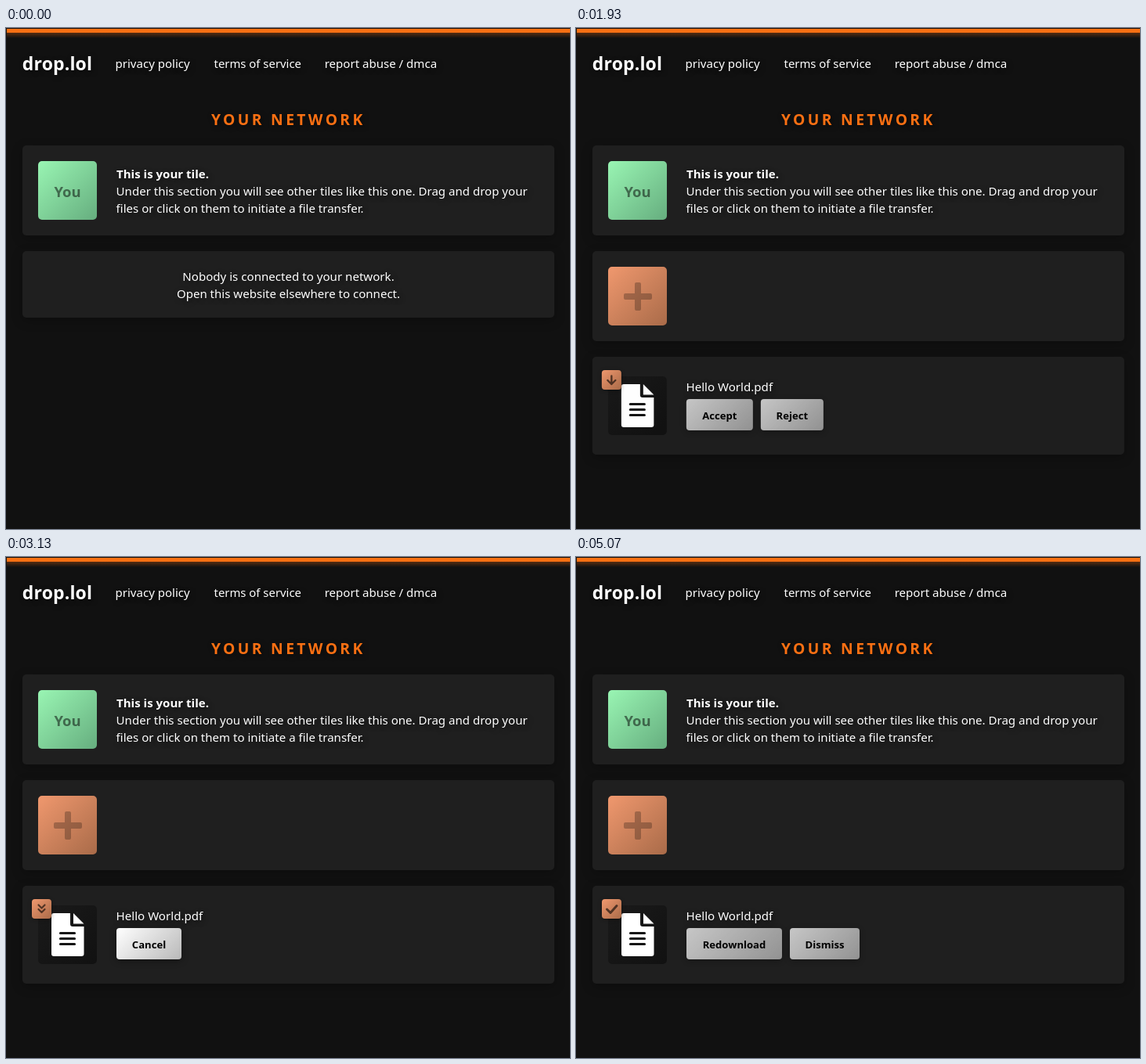
An HTML page that plays this animation: 720 px wide and 640 px high, repeating every 5540 ms.

```html
<!DOCTYPE html>
<html lang="en">
<head>
<meta charset="utf-8">
<title>drop.lol</title>
<style>
html, body { margin: 0; width: 720px; height: 640px; overflow: hidden; background: #111; }
body { position: relative; font: 15.05px "Noto Sans", "Open Sans", sans-serif; color: #fff; }
div, p, svg, button { position: absolute; margin: 0; box-sizing: border-box; }
/* zero line height: top is the middle of the text */
p { line-height: 0; white-space: pre; text-shadow: 2px 2px 6px rgba(0,0,0,.5); }
.bar { left: 1px; top: 1px; width: 719px; height: 5px; background: #fb7013; }
.glow { left: 1px; top: 6px; width: 719px; height: 7px; background: linear-gradient(rgba(251,112,19,.3), rgba(251,112,19,0)); }
.panel { left: 21px; width: 679px; border-radius: 5px; background: #1f1f1f; box-shadow: 0 4px 14px rgba(0,0,0,.25); }
.mid { left: 0; width: 679px; text-align: center; }
.tile { left: 20px; top: 20px; width: 75px; height: 75px; border-radius: 5px; }
.green { background: linear-gradient(135deg, #99f5b3, #66ae7f); }
.orange { background: linear-gradient(135deg, #f0986e, #a96b49); }
.file { top: 25px; background: linear-gradient(135deg, #1a1a1a, #111); }
.badge { left: 12px; top: 17px; width: 25px; height: 25px; border-radius: 4px; box-shadow: 0 1px 5px rgba(0,0,0,.4); }
.badge path { fill: none; stroke: rgba(0,0,0,.6); stroke-linecap: round; stroke-linejoin: round; }
button { top: 54px; height: 40px; padding: 0; border: 0; background: none; font: bold 13.1px/42px "Noto Sans", "Open Sans", sans-serif; color: #000; isolation: isolate; }
button::before { content: ""; position: absolute; inset: 0; z-index: -1; border-radius: 4px; opacity: var(--lit, .75);
  background: linear-gradient(135deg, #fff, #b9b9b9); box-shadow: 0 2px 8px rgba(0,0,0,.4); }
.track { left: 218px; top: 54px; width: 160px; height: 16px; border-radius: 4px; overflow: hidden; background: #4b4b4b; }
#fill { height: 16px; background: #c07847; }
[hidden] { display: none; }
</style>
</head>
<body>
<div class="bar"></div><div class="glow"></div>
<p style="left:20.8px;top:45px;font-size:23px;font-weight:bold;letter-spacing:.15px">drop.lol</p>
<p style="left:139.500px;top:45px">privacy policy</p>
<p style="left:265.500px;top:45px;font-size:14.9px">terms of service</p>
<p style="left:406.700px;top:45px">report abuse / dmca</p>
<p style="left:262px;top:116.500px;font-size:19.3px;font-weight:bold;letter-spacing:3.360px;color:#fb7013">YOUR NETWORK</p>

<div class="panel" style="top:150px;height:115px">
  <div class="tile green"></div>
  <p style="left:20px;width:75px;top:58.500px;text-align:center;font-size:18.5px;font-weight:bold;color:rgba(0,0,0,.5);text-shadow:none">You</p>
  <p style="left:120px;top:36px;font-weight:bold">This is your tile.</p>
  <p style="left:119.600px;top:58px">Under this section you will see other tiles like this one. Drag and drop your</p>
  <p style="left:119.600px;top:80px">files or click on them to initiate a file transfer.</p>
</div>

<div class="panel" id="peers" style="top:285px">
  <div id="nobody">
    <p class="mid" style="top:32px;font-size:15.1px">Nobody is connected to your network.</p>
    <p class="mid" style="top:54px">Open this website elsewhere to connect.</p>
  </div>
  <div class="tile orange" id="peer">
    <svg width="75" height="75" fill="rgba(0,0,0,.25)"><path d="M36 20h4q2 0 2 2v12h12q2 0 2 2v4q0 2-2 2H42v12q0 2-2 2h-4q-2 0-2-2V42H22q-2 0-2-2v-4q0-2 2-2h12V22q0-2 2-2z"/></svg>
  </div>
</div>

<div class="panel" id="transfer" style="top:420px;height:125px">
  <div class="tile file">
    <svg width="75" height="75">
      <path fill="#fff" d="M20 10h21v14q0 3 3 3h14.500v35q0 3-3 3H20q-3 0-3-3V13q0-3 3-3zM45 10l13.500 13.500H45z"/>
      <path stroke="#151515" stroke-width="3.200" stroke-linecap="round" d="M28.500 35.500h18M28.500 42.500h18M28.500 49.500h18"/>
    </svg>
  </div>
  <div class="badge orange">
    <svg width="25" height="25"><path id="mark"/></svg>
  </div>
  <p style="left:119.600px;top:38px;font-size:15.1px">Hello World.pdf</p>
  <div class="stage">
    <button id="accept" style="left:120px;width:85px">Accept</button>
    <button style="left:215px;width:80px">Reject</button>
  </div>
  <div class="stage">
    <button id="cancel" style="left:120px;width:83px">Cancel</button>
    <div id="progress">
      <div class="track"><div id="fill"></div></div>
      <p id="speed" style="left:218px;width:160px;top:83px;text-align:center"></p>
    </div>
  </div>
  <div class="stage">
    <button style="left:120px;width:122px">Redownload</button>
    <button style="left:252px;width:89px">Dismiss</button>
  </div>
</div>

<script>
const LOOP = 5540, JOIN = 330, POP = 415, SLIDE = 1755;
const HOVER = 2600, ACCEPTED = 2940, LOAD = 3270, LEAVE = 3600, DONE = 4670;
const $ = id => document.getElementById(id);
const stages = document.querySelectorAll('.stage');
const marks = [
  ['M12.5 7.5V18M7.5 13l5 5 5-5', 2.4],
  ['M8.5 7.5l4 4 4-4M8.5 13l4 4 4-4', 2.2],
  ['M6.5 13l4.5 4.5L19 8.5', 3]
];

const ramp = (t, start, length) => Math.min(1, Math.max(0, (t - start) / length));

// Remaining distance of a damped spring (stiffness 260, damping 20), 1 to 0
function spring(ms) {
  if (ms <= 0) return 1;
  const s = ms / 1000, w = Math.sqrt(260 - 100);
  return Math.exp(-10 * s) * (Math.cos(w * s) + 10 / w * Math.sin(w * s));
}

function draw(t) {
  const joined = t >= JOIN;
  $('nobody').hidden = joined;
  $('peers').style.height = joined ? '115px' : '85px';
  const pop = spring(t - POP);
  $('peer').style.opacity = 1 - pop;
  $('peer').style.transform = `rotate(${-180 * pop}deg) scale(${1 - pop / 2})`;

  const slide = spring(t - SLIDE);
  $('transfer').style.opacity = 1 - slide;
  $('transfer').style.transform = `translateX(${-50 * slide}px)`;

  const stage = t < ACCEPTED ? 0 : t < DONE ? 1 : 2;
  stages.forEach((el, i) => el.hidden = i !== stage);
  $('mark').setAttribute('d', marks[stage][0]);
  $('mark').setAttribute('stroke-width', marks[stage][1]);
  $('accept').style.setProperty('--lit', .75 + .25 * ramp(t, HOVER, 200));
  $('cancel').style.setProperty('--lit', 1 - .25 * ramp(t, LEAVE, 200));

  $('progress').hidden = t < LOAD;
  $('fill').style.width = 160 * ramp(t, LOAD, 1247) + 'px';
  const tick = Math.min(3, Math.floor((t - LOAD) / 300));
  $('speed').textContent = 1608 - 47 * (3 - tick) + ' kB/s';
}

const begin = performance.now();
function frame() {
  draw((performance.now() - begin) % LOOP);
  requestAnimationFrame(frame);
}
frame();
</script>
</body>
</html>
```
